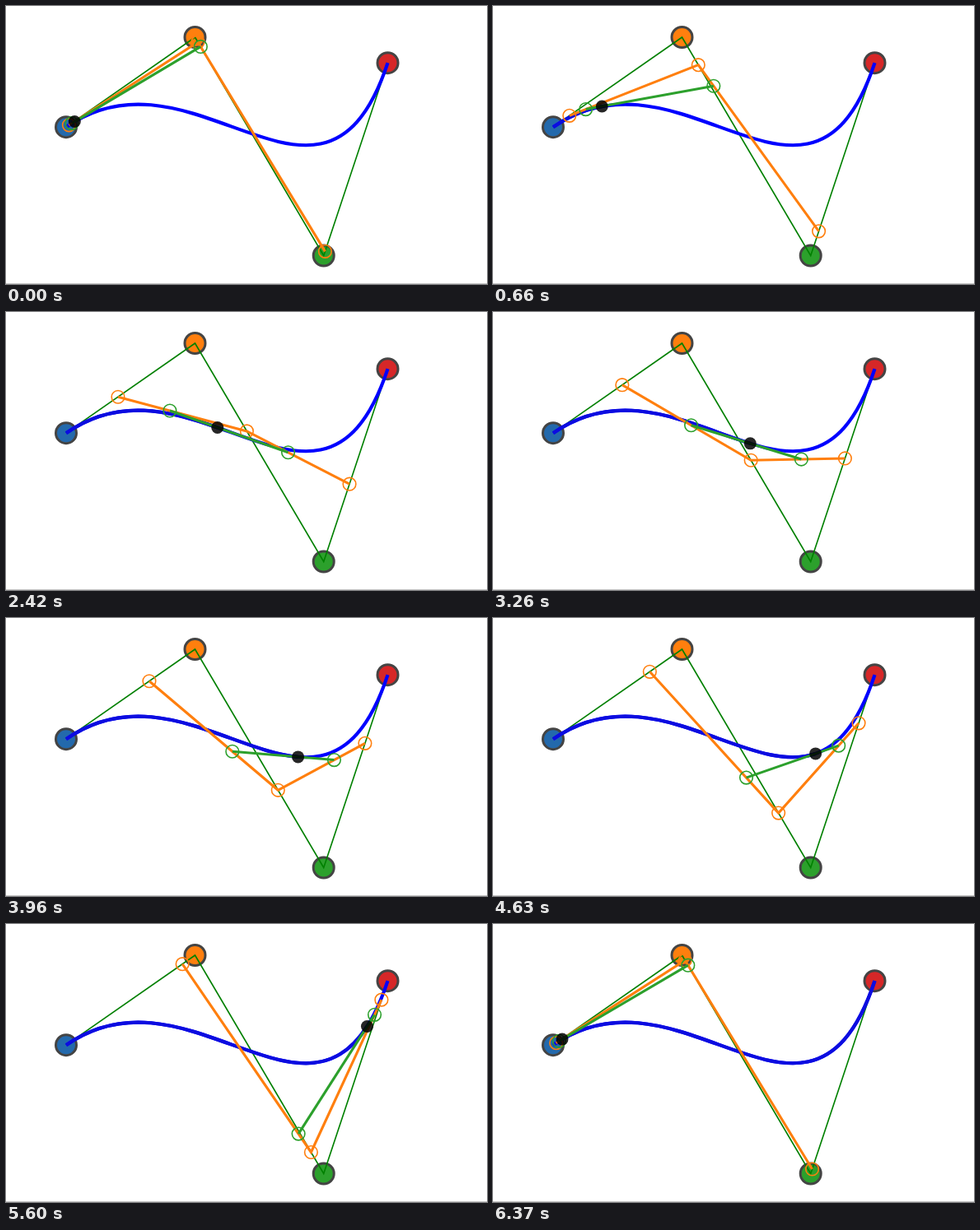
An HTML page with a canvas for the animation above (6.4 s loop, 584 by 338 pixels).

```html
<!DOCTYPE html>
<html lang="en">
<head>
<meta charset="utf-8">
<title>Cubic Bézier construction</title>
<style>
  html, body { margin: 0; width: 100%; height: 100%; overflow: hidden; background: #fff; }
  canvas { display: block; width: 584px; height: 338px; }
</style>
</head>
<body>
<canvas id="stage" width="584" height="338"></canvas>
<script>
const ctx = document.getElementById('stage').getContext('2d');
const LOOP = 6400, TICK = 30.25, LAST_TICK = 210;
const ORANGE = '#ff7f0e', GREEN = '#2ca02c';
const points = [[73, 147.2], [229.5, 38], [385.7, 303.5], [463.5, 69.2]];
const fills = ['#2369ac', ORANGE, GREEN, '#d62728'];

const mix = (a, b, t) => [a[0] + (b[0] - a[0]) * t, a[1] + (b[1] - a[1]) * t];

// One De Casteljau step: n points become n - 1.
const reduce = (pts, t) => pts.slice(1).map((p, i) => mix(pts[i], p, t));

function line(pts, color, width) {
  ctx.beginPath();
  pts.forEach(p => ctx.lineTo(p[0], p[1]));
  ctx.strokeStyle = color;
  ctx.lineWidth = width;
  ctx.stroke();
}

function circle(p, r, fill, stroke, width) {
  ctx.beginPath();
  ctx.arc(p[0], p[1], r, 0, Math.PI * 2);
  if (fill) {
    ctx.fillStyle = fill;
    ctx.fill();
  }
  if (stroke) {
    ctx.strokeStyle = stroke;
    ctx.lineWidth = width;
    ctx.stroke();
  }
}

function curve(color, a, b, c, d) {
  ctx.beginPath();
  ctx.moveTo(a[0], a[1]);
  ctx.bezierCurveTo(b[0], b[1], c[0], c[1], d[0], d[1]);
  ctx.strokeStyle = color;
  ctx.lineWidth = 4.2;
  ctx.stroke();
}

function draw(ms) {
  const tick = Math.min(LAST_TICK, Math.floor((ms + 10.5) / TICK));
  const run = 0.022 + tick * 0.004757;
  const wrapped = run > 1;
  const t = wrapped ? run - 0.9975 : run;

  const outer = reduce(points, t);
  const inner = reduce(outer, t);
  const tip = reduce(inner, t)[0];

  ctx.fillStyle = '#fff';
  ctx.fillRect(0, 0, 584, 338);
  ctx.fillStyle = '#c6c6c6';
  ctx.fillRect(0, 337, 584, 1);

  points.forEach((p, i) => circle(p, 12.5, fills[i], '#444', 3));
  line(points, '#008000', 1.6);

  // The travelled part of the curve is a little darker.
  curve('#0000ff', ...points);
  if (wrapped) curve('#0c0ce0', ...points);
  else curve('#0c0ce0', points[0], outer[0], inner[0], tip);

  line(outer, ORANGE, 3.1);
  outer.forEach(p => circle(p, 7.8, null, ORANGE, 1.6));
  line(inner, GREEN, 3.1);
  inner.forEach(p => circle(p, 7.8, null, GREEN, 1.6));
  circle(tip, 7.5, 'rgba(0,0,0,0.85)');
}

let start = null;
function loop(now) {
  if (start === null) start = now;
  draw((now - start) % LOOP);
  requestAnimationFrame(loop);
}
draw(0);
requestAnimationFrame(loop);
</script>
</body>
</html>
```
